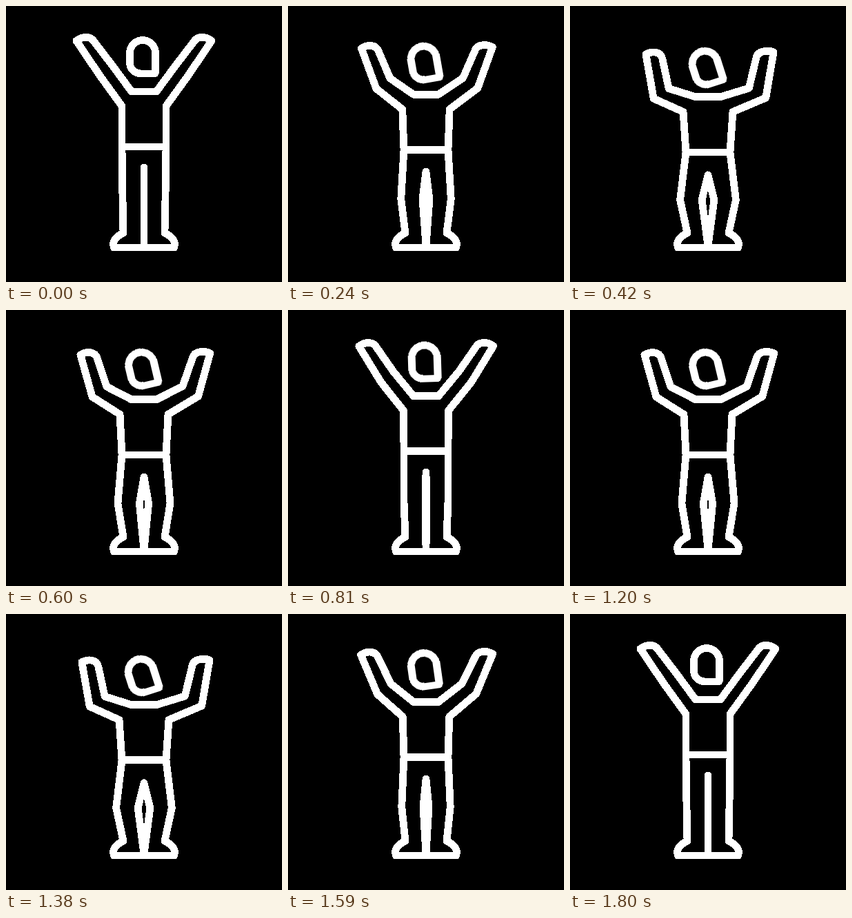
An HTML page for the animation above (1830 ms loop, 400 by 400 pixels).

```html
<!DOCTYPE html>
<html lang="en">
<head>
<meta charset="utf-8">
<title>Arm raise</title>
<style>
  html, body {
    margin: 0;
    width: 100%;
    height: 100%;
    overflow: hidden;
    background: #000;
  }

  svg {
    display: block;
    width: 100%;
    height: 100%;
  }

  path {
    fill: none;
    stroke: #fff;
    stroke-width: 10.8px;
    stroke-linecap: round;
    stroke-linejoin: round;
    shape-rendering: crispEdges;
  }

  .body, .legs {
    d: var(--tall);
    animation: squat 1830ms cubic-bezier(.333, 0, .667, 1) infinite;
  }

  /* Both poses use the same commands so that they blend point by point. */
  .body {
    --tall: path("M168 145 L136.5 101.5 L102 50.5 C107 47 112 44.8 117 45.2 C122 45.7 126 48.5 128 52 L154 86 L182 124 L218 124 L246 86 L272 52 C274 48.5 278 45.7 283 45.2 C288 44.8 293 47 298 50.5 L263.5 101.5 L232 145 L232 204 L231 278 L230 329 C238 333 245 338 244.5 346 L243.5 350 L156.5 350 L155.5 346 C155 338 162 333 170 329 L169 278 L168 204 Z M168 204 L232 204");
    --low: path("M164 153.5 L121 134.5 L110 70 C114 68 119 66.5 124 67.5 C130 68.5 133 72 134 77 L143 120 L182 131.8 L218 131.8 L259.5 119.5 L270 75 C271 70 275 67 281 66 C286 65.3 291 65.3 295 67 L284 133.5 L236 153.5 L232 212 L240.5 281 L230 329 C238 333 245 338 244.5 346 L243.5 350 L156.5 350 L155.5 346 C155 338 162 333 170 329 L159.5 281 L168 212 Z M168 212 L232 212");
  }

  .legs {
    --tall: path("M200 234 L200 278 L200 348 L200 278 Z");
    --low: path("M200 245 L191 281 L200 348 L209 281 Z");
  }

  .head {
    transform-origin: 198px 74px;
    animation: nod 1830ms cubic-bezier(.333, 0, .667, 1) infinite;
  }

  /* Two 900 ms squats, then a 30 ms rest. */
  @keyframes squat {
    0%, 49.18%, 98.36%, 100% { d: var(--tall); }
    24.59%, 73.77% { d: var(--low); }
  }

  @keyframes nod {
    0%, 49.18%, 98.36%, 100% { transform: translate(0px, 0px) rotate(0deg); }
    24.59%, 73.77% { transform: translate(-.5px, 15.7px) rotate(-18deg); }
  }
</style>
</head>
<body>
<svg viewBox="0 0 400 400">
  <path class="body"/>
  <path class="legs"/>
  <path class="head" d="M179.5 68 A18.5 18.5 0 0 1 216.5 68 V96 Q216.5 98 214.5 98 H195.5 A16 16 0 0 1 179.5 82 Z"/>
</svg>
</body>
</html>
```
